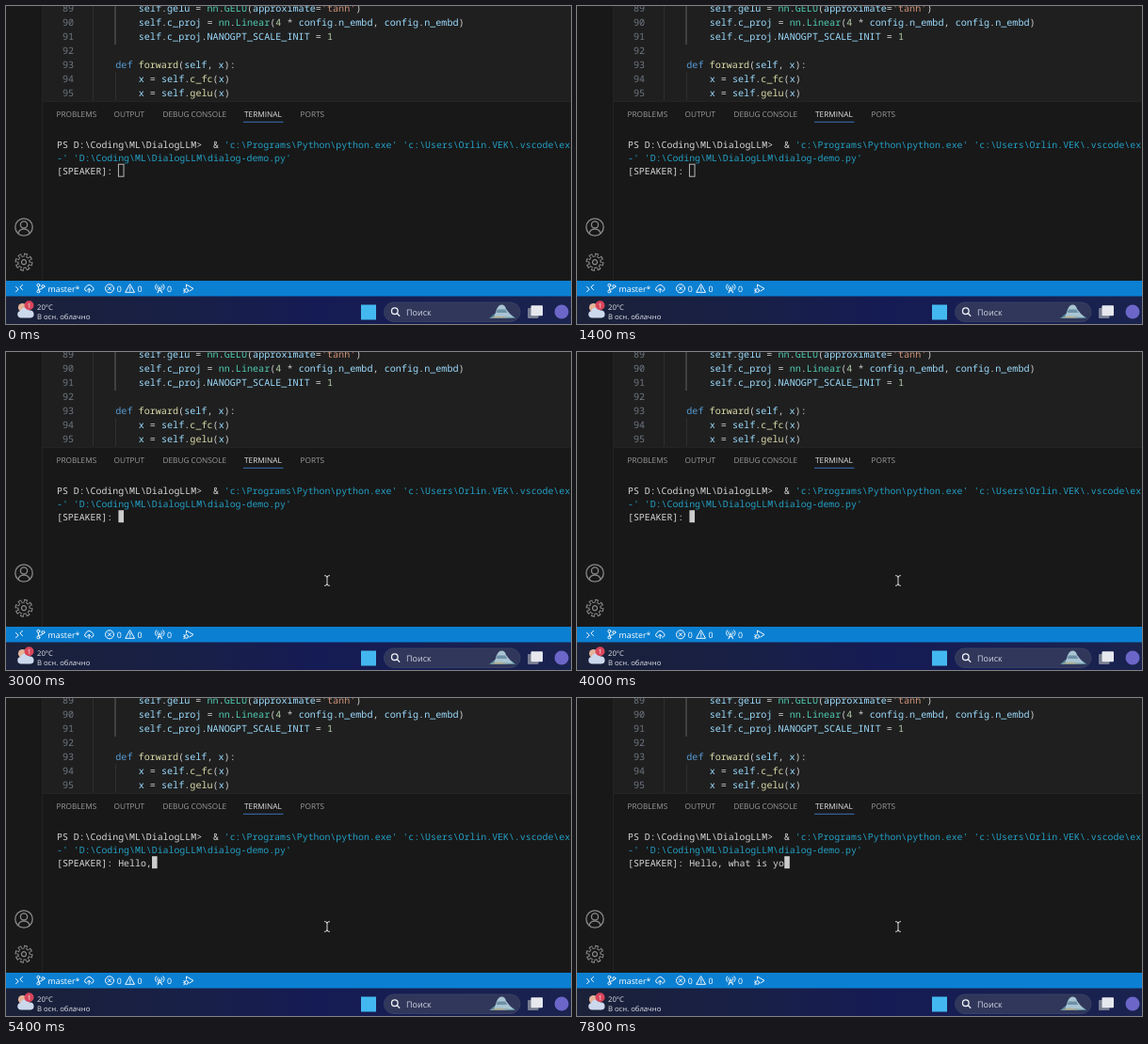
Recreate the animation shown at these times as an HTML page. Size 600 by 338 pixels, loop 8000 ms.

```html
<!DOCTYPE html>
<html lang="en">
<head>
<meta charset="utf-8">
<title>Terminal dialog</title>
<style>
  html, body { margin: 0; width: 100%; height: 100%; overflow: hidden; background: #181818; }
  svg { display: block; width: 100vw; height: 100vh; }
  text { white-space: pre; text-rendering: geometricPrecision; font-family: "Open Sans", "Noto Sans", sans-serif; }
  .code text, .term text { font-family: "Noto Sans Mono", "DejaVu Sans Mono", monospace; font-weight: 500; }
  .code { font-size: 10.12px; fill: #ccc; }
  .term { font-size: 9.883px; fill: #d6d6d6; }
  .n { fill: #6e7681; }
  .v { fill: #9cdcfe; }
  .t { fill: #4ec9b0; }
  .f { fill: #dcdcaa; }
  .k { fill: #569cd6; }
  .s { fill: #ce9178; }
  .d { fill: #b5cea8; }
  .c { fill: #239fc4; }
  .tabs { font-size: 8.25px; fill: #9a9a9a; }
  .line { fill: none; stroke-linecap: round; stroke-linejoin: round; }
</style>
</head>
<body>
<svg viewBox="0 0 600 338">
  <defs>
    <linearGradient id="bar">
      <stop stop-color="#1a2138"/><stop offset=".35" stop-color="#181f48"/>
      <stop offset=".55" stop-color="#151b54"/><stop offset="1" stop-color="#1a234e"/>
    </linearGradient>
  </defs>

  <!-- Editor -->
  <rect width="600" height="338" fill="#181818"/>
  <rect x="38" width="562" height="101" fill="#1f1f1f"/>
  <path d="M38.5 0V292M38 101.5H600" stroke="#232323"/>
  <path d="M92.5 0V100M116.5 70V100" stroke="#343434" stroke-width=".8"/>
  <path d="M116 0V41" stroke="#626262"/>
  <g class="code">
    <g class="n">
      <text x="60" y="5.7">89</text><text x="60" y="20.7">90</text><text x="60" y="35.8">91</text>
      <text x="60" y="50.8">92</text><text x="60" y="65.9">93</text><text x="60" y="80.9">94</text><text x="60" y="95.9">95</text>
    </g>
    <text x="140.7" y="5.7"><tspan class="v">self</tspan>.<tspan class="v">gelu</tspan> = <tspan class="t">nn</tspan>.<tspan class="t">GELU</tspan>(<tspan class="v">approximate</tspan>=<tspan class="s">'tanh'</tspan>)</text>
    <text x="140.7" y="20.7"><tspan class="v">self</tspan>.<tspan class="v">c_proj</tspan> = <tspan class="t">nn</tspan>.<tspan class="t">Linear</tspan>(<tspan class="d">4</tspan> * <tspan class="v">config</tspan>.<tspan class="v">n_embd</tspan>, <tspan class="v">config</tspan>.<tspan class="v">n_embd</tspan>)</text>
    <text x="140.7" y="35.8"><tspan class="v">self</tspan>.<tspan class="v">c_proj</tspan>.<tspan class="v">NANOGPT_SCALE_INIT</tspan> = <tspan class="d">1</tspan></text>
    <text x="116.3" y="65.9"><tspan class="k">def</tspan> <tspan class="f">forward</tspan>(<tspan class="v">self</tspan>, <tspan class="v">x</tspan>):</text>
    <text x="140.7" y="80.9"><tspan class="v">x</tspan> = <tspan class="v">self</tspan>.<tspan class="f">c_fc</tspan>(<tspan class="v">x</tspan>)</text>
    <text x="140.7" y="95.9"><tspan class="v">x</tspan> = <tspan class="v">self</tspan>.<tspan class="f">gelu</tspan>(<tspan class="v">x</tspan>)</text>
  </g>

  <!-- Panel -->
  <g class="tabs">
    <text x="53.5" y="118">PROBLEMS</text>
    <text x="114.5" y="118">OUTPUT</text>
    <text x="166.5" y="118">DEBUG CONSOLE</text>
    <text x="253" y="118" fill="#e4e4e4">TERMINAL</text>
    <text x="312.5" y="118">PORTS</text>
  </g>
  <rect x="252" y="122.8" width="42.5" height="1" fill="#3a70b8"/>
  <g class="term">
    <text x="54" y="151.3">PS D:\Coding\ML\DialogLLM&gt;  &amp; <tspan class="c">'c:\Programs\Python\python.exe' 'c:\Users\Orlin.VEK\.vscode\ex</tspan></text>
    <text x="54" y="164.9" class="c">-' 'D:\Coding\ML\DialogLLM\dialog-demo.py'</text>
    <text x="54" y="178.5" id="prompt"></text>
  </g>
  <rect id="cursor" y="168.2" width="5.6" height="13"/>
  <path id="pointer" class="line" d="M338.5 237.6Q341 237.6 341 239.5Q341 237.6 343.5 237.6M341 239.5V246.5M338.5 248.4Q341 248.4 341 246.5Q341 248.4 343.5 248.4" stroke="#d8d8d8"/>

  <!-- Activity bar -->
  <g class="line" stroke="#8a8a8a" stroke-width="1.3">
    <circle cx="19" cy="235" r="9.2"/>
    <circle cx="19" cy="232.4" r="3.6"/>
    <path d="M13 241.6Q14 237.2 19 237.2T25 241.6"/>
  </g>
  <g transform="translate(19 272.2)" stroke-width="3.4">
    <circle r="6.8" fill="#8a8a8a"/>
    <circle r="7.8" fill="none" stroke="#8a8a8a" pathLength="16" stroke-dasharray="1.2 .8"/>
    <circle r="5.6" fill="#181818"/>
    <circle r="6.6" fill="none" stroke="#181818" pathLength="16" stroke-dasharray=".7 1.3" stroke-dashoffset="-.25"/>
    <circle r="2.5" fill="none" stroke="#8a8a8a" stroke-width="1.2"/>
  </g>

  <!-- Status bar -->
  <rect y="292" width="600" height="17" fill="#0b80d2"/>
  <g class="line" stroke="#f2f8fd">
    <path d="M10.5 298.5L13.2 301L10.5 303.8M17.5 296.3L14.8 299L17.5 301.6"/>
    <circle cx="34.4" cy="296.8" r="1.5"/><circle cx="34.4" cy="303.4" r="1.5"/><circle cx="39.4" cy="298" r="1.5"/>
    <path d="M34.4 298.3V301.9M39.4 299.5Q39 301 34.8 301.4"/>
    <path d="M86 303H85.3A2.3 2.3 0 0 1 85.2 298.6A3.3 3.3 0 0 1 91.3 298.4A2.4 2.4 0 0 1 91.3 303H90.5M88.2 304.5V300.3M86.7 301.7L88.2 300.2L89.7 301.7"/>
    <circle cx="110" cy="300.3" r="4.5"/>
    <path d="M108.3 298.6L111.7 302M111.7 298.6L108.3 302"/>
    <path d="M131.8 295.9L136.5 304.3H127.1ZM131.8 298.7V301.4M131.8 302.7V302.9"/>
    <path d="M163.3 299L161 304.8M163.3 299L165.6 304.8M161.8 302.7H164.8M161.5 300.4A2.2 2.2 0 0 1 161.5 297M165.1 300.4A2.2 2.2 0 0 0 165.1 297M159.8 301.6A4.2 4.2 0 0 1 159.8 295.8M166.8 301.6A4.2 4.2 0 0 0 166.8 295.8"/>
    <path d="M191.5 299V296L199 300.4L194.8 303"/>
    <circle cx="191.6" cy="302.4" r="1.9"/>
    <path d="M188.8 300.8L190 301.4M188.6 302.7H189.7M188.8 304.7L190 303.9"/>
  </g>
  <g font-size="8.8" font-weight="500" fill="#fff">
    <text x="44.6" y="304">master*</text>
    <text x="117.8" y="304">0</text><text x="139.5" y="304">0</text><text x="171" y="304">0</text>
  </g>

  <!-- Taskbar -->
  <rect y="308.5" width="600" height="29.5" fill="url(#bar)"/>
  <circle cx="17.5" cy="320.5" r="4.6" fill="#e3b49a"/>
  <path d="M15.5 331.5A3.8 3.8 0 0 1 15.3 324A5.3 5.3 0 0 1 25 323.5A4 4 0 0 1 26 331.5Z" fill="#ccd8ec"/>
  <circle cx="24.5" cy="318.3" r="5" fill="#d8455a"/>
  <text x="22.8" y="320.9" font-size="6.8" fill="#fff">1</text>
  <g font-size="7.7" font-weight="500" fill="#e6e8f0">
    <text x="33" y="322.8">20°C</text>
    <text x="33" y="333.4">В осн. облачно</text>
  </g>

  <rect x="377" y="317.5" width="16" height="16" fill="#43b8f0"/>
  <rect x="401.5" y="315" width="144.5" height="20.5" rx="10.2" fill="#30375a" stroke="#3c4468" stroke-width=".8"/>
  <g class="line" stroke="#f0f2f8" stroke-width="1.3">
    <circle cx="412.8" cy="324.2" r="3.3"/><path d="M415.2 326.6L417.8 329.2"/>
  </g>
  <text x="425" y="328.7" font-size="9" fill="#d5d8e4">Поиск</text>
  <path d="M513 332L519 327H533Q539 329 541 332Z" fill="#5d8a9c"/>
  <path d="M518.5 330L521 322.5Q523 317.5 526.5 317.5T531 322L535 327L539 331Z" fill="#a9c4d3"/>
  <path d="M522 322.5H530L532.5 326H520.5Z" fill="#6d90a6"/>
  <path d="M515 331.5Q522 328.5 527 330T538 331.5Z" fill="#b9b08f"/>

  <rect x="554" y="321" width="11.5" height="11" rx="1" fill="#777d91"/>
  <rect x="557.5" y="318.3" width="12.5" height="11" rx="1" fill="#e6e8ee"/>
  <circle cx="590" cy="325" r="7.5" fill="#6b66c8"/>
</svg>
<script>
  const LOOP = 8000, STEP = 200;
  const FOCUS = 2400, TYPE_START = 4200, KEY_INTERVAL = 218;
  const LEFT = 54, CHAR = 5.93;
  const label = "[SPEAKER]: ", message = "Hello, what is your";
  const prompt = document.getElementById("prompt");
  const cursor = document.getElementById("cursor");
  const pointer = document.getElementById("pointer");

  function render(now) {
    const time = Math.floor((now % LOOP) / STEP) * STEP;
    const typed = Math.max(0, Math.floor((time - TYPE_START) / KEY_INTERVAL) + 1);
    const focused = time >= FOCUS;
    const line = label + message.slice(0, typed);

    prompt.textContent = line;
    cursor.setAttribute("x", LEFT + line.length * CHAR + .2);
    cursor.setAttribute("fill", focused ? "#cccccc" : "none");
    cursor.setAttribute("stroke", focused ? "none" : "#b8b8b8");
    pointer.setAttribute("visibility", focused ? "visible" : "hidden");
    requestAnimationFrame(render);
  }
  requestAnimationFrame(render);
</script>
</body>
</html>
```
